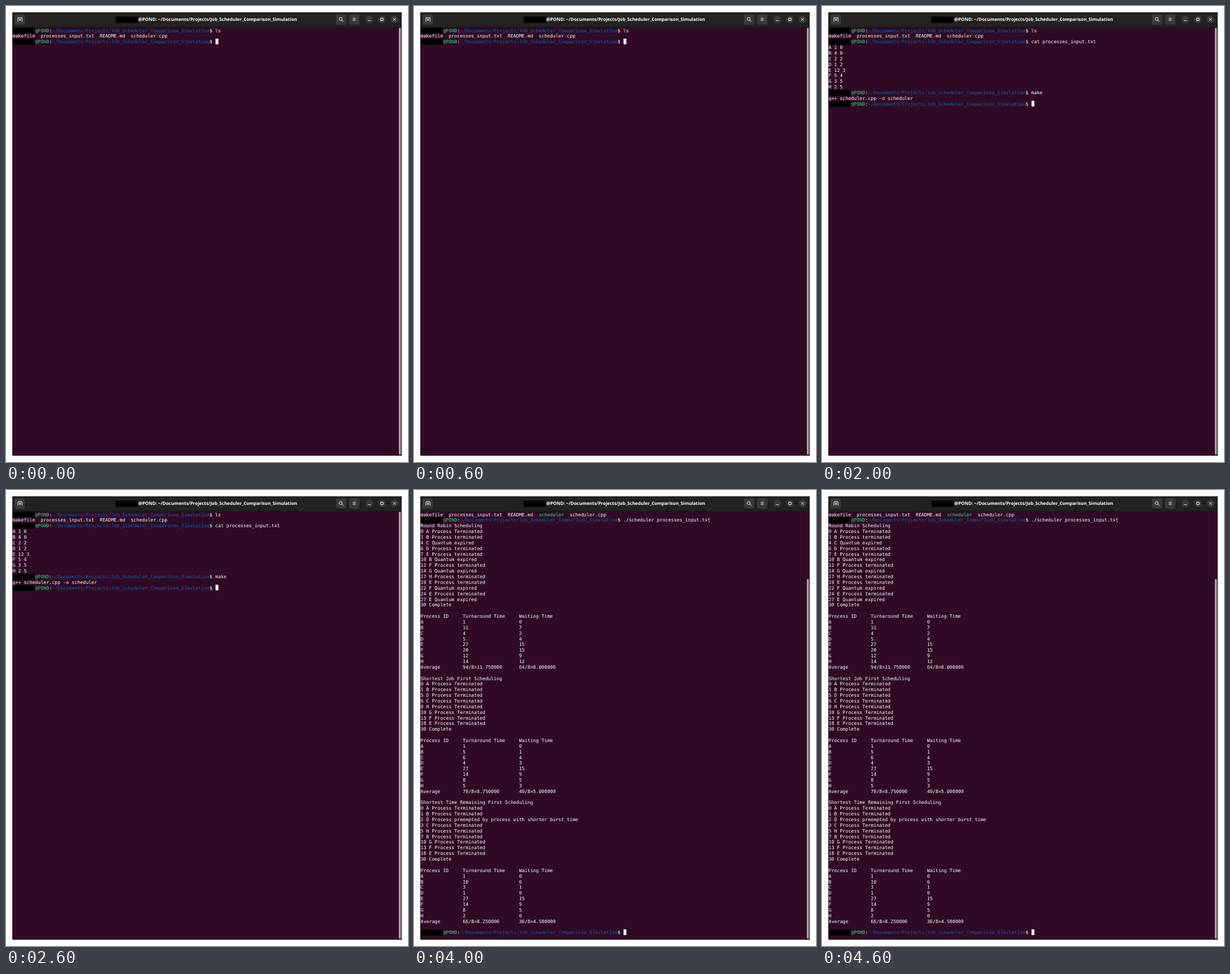
Write an HTML page that moves like this. It is 703x796 px and loops after 5000 ms.

```html
<!DOCTYPE html>
<html lang="en">
<head>
<meta charset="utf-8">
<title>Job scheduler terminal</title>
<style>
  html, body { margin: 0; width: 100%; height: 100%; overflow: hidden; background: #fff; }
  svg { display: block; width: 703px; height: 796px; }
  text { white-space: pre; text-rendering: geometricPrecision; fill: #fff; }
  #screen text { font: 8.189px "DejaVu Sans Mono", "Noto Sans Mono", monospace; }
  #title { font: bold 7.92px "Open Sans", "Noto Sans", sans-serif; text-anchor: end; }
  .host, .exe { font-weight: bold; fill: #26a269; }
  .path { font-weight: bold; fill: #12488b; }
  .button { fill: #393937; }
  .icon { fill: none; stroke: #f4f4f2; stroke-width: 1; }
</style>
</head>
<body>
<svg viewBox="0 0 703 796">
  <rect x="11" y="11" width="681" height="774" fill="#300a24"/>
  <rect x="11" y="11" width="681" height="25.5" fill="#222220"/>

  <g class="button">
    <rect x="15" y="14.5" width="18" height="18" rx="3"/>
    <rect x="577" y="14.5" width="18" height="18" rx="3"/>
    <rect x="600" y="14.5" width="18" height="18" rx="3"/>
    <circle cx="635.5" cy="23.5" r="6.6"/>
    <circle cx="657.5" cy="23.5" r="6.6"/>
    <circle cx="679.5" cy="23.5" r="6.6"/>
  </g>
  <g class="icon">
    <path d="M20 26.5h1v-6h7v6h1M24.5 22v4M22.5 24h4"/>
    <circle cx="585.4" cy="22.8" r="2.7"/>
    <path d="M587.4 24.8l2.6 2.6"/>
    <path d="M606.5 21.5h5M606.5 23.5h5M606.5 25.5h5" stroke-width=".8"/>
    <path d="M633.3 25.5h4.4"/>
    <rect x="655.5" y="21.5" width="4" height="4"/>
    <path d="M677.3 21.3l4.4 4.4M681.7 21.3l-4.4 4.4"/>
  </g>

  <rect id="titleMask" y="18.5" width="38.5" height="11"/>
  <text id="title" x="509" y="26.3"></text>
  <g id="screen"></g>
  <rect id="thumb" x="687" width="3.6" rx="1.8" fill="#aaa5a6"/>
</svg>

<script>
const STEP_MS = 1000;
const LEFT = 11.5, TOP = 38, COL = 4.93, ROW = 9.86;
const VISIBLE_ROWS = 75, TRACK_END = 783;
const HOST = "@POND";
const PATH = "~/Documents/Projects/Job_Scheduler_Comparison_Simulation";
const PROMPT_COLS = 8 + HOST.length + 1 + PATH.length + 2;

const $ = id => document.getElementById(id);
const span = (cls, text) => `<tspan class="${cls}">${text}</tspan>`;

const jobs = [
  ["A", 1, 0], ["B", 4, 0], ["C", 2, 2], ["D", 1, 2],
  ["E", 12, 3], ["F", 5, 4], ["G", 3, 5], ["H", 2, 5]
];

const sum = list => list.reduce((a, b) => a + b, 0);
const average = list => `${sum(list)}/${list.length}=${(sum(list) / list.length).toFixed(6)}`;
const tableRow = (id, turnaround, waiting) =>
  String(id).padEnd(15) + String(turnaround).padEnd(20) + waiting;

const OUTCOMES = {
  T: "Process Terminated",
  t: "Process terminated",
  q: "Quantum expired",
  p: "Process preempted by process with shorter burst time"
};

// Events read as time, job and outcome: "4Cq".
function report(name, events, turnaround) {
  const waiting = turnaround.map((time, i) => time - jobs[i][1]);
  const log = events.split(" ").map(event => {
    const [, time, job, outcome] = event.match(/(\d+)(.)(.)/);
    return `${time} ${job} ${OUTCOMES[outcome]}`;
  });
  return [
    `${name} Scheduling`, ...log, "30 Complete", "",
    tableRow("Process ID", "Turnaround Time", "Waiting Time"),
    ...jobs.map(([id], i) => tableRow(id, turnaround[i], waiting[i])),
    tableRow("Average", average(turnaround), average(waiting)), ""
  ];
}

const listing = exe => `makefile  processes_input.txt  README.md  ${exe}scheduler.cpp`;

const session = [
  ["ls", [listing("")]],
  ["cat processes_input.txt", jobs.map(job => job.join(" "))],
  ["make", ["g++ scheduler.cpp -o scheduler"]],
  ["ls", [listing(span("exe", "scheduler") + "  ")]],
  ["./scheduler processes_input.txt", [
    ...report("Round Robin",
      "0AT 1Bt 4Cq 6Dt 7Et 10Bq 11Ft 14Gq 17Ht 19Et 22Fq 24Et 27Eq",
      [1, 11, 4, 5, 27, 20, 12, 14]),
    ...report("Shortest Job First",
      "0AT 1BT 5DT 6CT 8HT 10GT 13FT 18ET",
      [1, 5, 6, 4, 27, 14, 8, 5]),
    ...report("Shortest Time Remaining First",
      "0AT 1BT 2Dp 3CT 5HT 7BT 10GT 13FT 18ET",
      [1, 10, 3, 1, 27, 14, 8, 2])
  ]]
];

const rect = (x, y, width, height, fill) =>
  `<rect x="${x}" y="${y}" width="${width}" height="${height}" fill="${fill}"/>`;

const textAt = (col, row, content) =>
  `<text x="${LEFT + col * COL}" y="${TOP + row * ROW + 7.6}">${content}</text>`;

function promptAt(row, command) {
  return rect(LEFT, TOP + row * ROW - .2, 38.6, ROW + .4, "#000") +
    textAt(8, row, `${span("host", HOST)}:${span("path", PATH)}$ ${command}`);
}

function render(step) {
  const lines = session.slice(0, step + 1).flatMap(([command, output]) => [
    row => promptAt(row, command),
    ...output.map(line => row => textAt(0, row, line))
  ]);
  lines.push(row => promptAt(row, "") +
    rect(LEFT + PROMPT_COLS * COL, TOP + row * ROW - .7, COL, ROW, "#fff"));

  $("screen").innerHTML = lines.slice(-VISIBLE_ROWS).map((draw, row) => draw(row)).join("");

  const track = TRACK_END - TOP;
  const thumb = track * Math.min(1, VISIBLE_ROWS / lines.length);
  $("thumb").setAttribute("y", TRACK_END - thumb);
  $("thumb").setAttribute("height", thumb);
  $("titleMask").setAttribute("x", step ? 191.2 : 192.2);
}

$("title").textContent = `${HOST}: ${PATH}`;
const start = performance.now();
let shown = -1;

function tick() {
  const step = Math.floor((performance.now() - start) / STEP_MS) % session.length;
  if (step !== shown) render(shown = step);
  requestAnimationFrame(tick);
}
tick();
</script>
</body>
</html>
```
